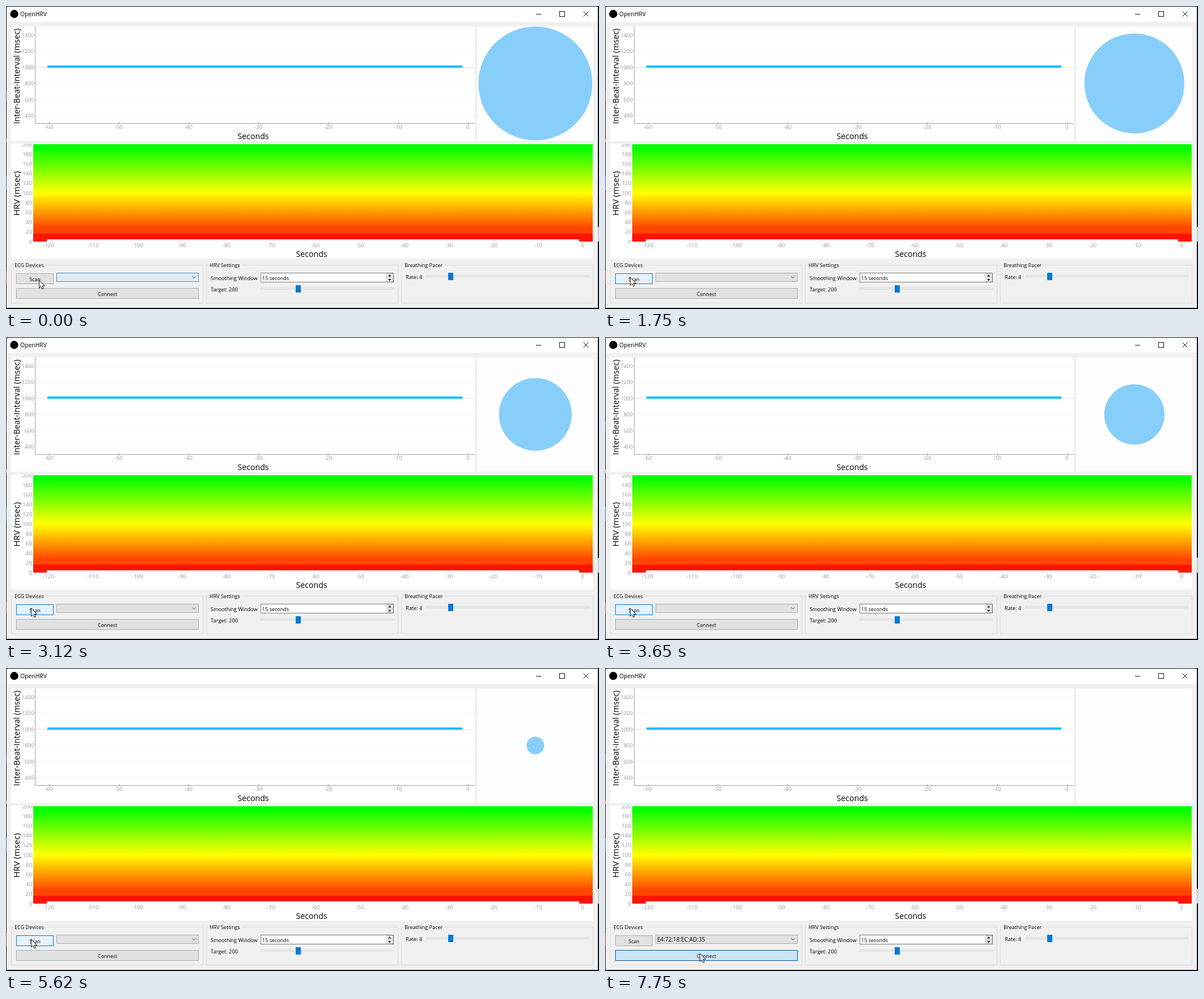
An HTML page with a canvas for the animation above (7780 ms loop, 1046 px wide and 535 px high).

```html
<!DOCTYPE html>
<html lang="en">
<head>
<meta charset="utf-8">
<title>OpenHRV</title>
<style>
  html, body { margin: 0; width: 100%; height: 100%; overflow: hidden; background: #f0f0f0; }
  canvas { display: block; }
</style>
</head>
<body>
<canvas id="stage" width="1046" height="535"></canvas>
<script>
const LOOP = 7780;
const ctx = document.getElementById('stage').getContext('2d');
const FONT = '"Open Sans", "Noto Sans", sans-serif';

const REST = [225, 225, 225, 173, 173, 173];
const HOVER = [229, 241, 251, 0, 120, 215];
const PRESS = [204, 228, 247, 0, 84, 153];
const FADING = [226, 235, 244, 70, 140, 200];

// Tracks: [time, values], linear in between
const scanTrack = [[50, REST], [330, HOVER], [510, HOVER], [620, PRESS], [920, PRESS],
  [1240, HOVER], [6450, HOVER], [6750, REST]];
const comboTrack = [[0, FADING], [280, REST]];
const connectTrack = [[6870, REST], [7090, HOVER], [7590, HOVER], [7710, PRESS]];
const cursorTrack = [[30, [58, 484]], [370, [44, 479]], [6370, [44, 479]], [6600, [112, 481]],
  [6850, [169, 490]], [7090, [161, 510]], [7160, [161, 510]], [7430, [167, 504]]];
const DEVICE_FOUND = 5865;

// Repaints of the pacer: [first, last, count]
const paints = [[30, 370, 4], [510, 1240, 7], [1340, 1340, 1], [1490, 2140, 6], [2270, 3020, 7],
  [3120, 3120, 1], [3290, 3650, 4], [3810, 4540, 7], [4640, 5390, 7], [5490, 6240, 7],
  [6370, 7100, 8], [7160, 7430, 3], [7590, 7750, 2]];

function track(keys, t) {
  if (t <= keys[0][0]) return keys[0][1];
  for (let i = 1; i < keys.length; i++) {
    const [t0, a] = keys[i - 1], [t1, b] = keys[i];
    if (t < t1) return a.map((v, k) => v + (b[k] - v) * (t - t0) / (t1 - t0));
  }
  return keys[keys.length - 1][1];
}

function lastPaint(t) {
  let last = 0;
  for (const [first, end, count] of paints) {
    if (t < first) break;
    const step = count > 1 ? (end - first) / (count - 1) : 1;
    last = first + step * Math.min(count - 1, Math.floor((t - first) / step + 1e-6));
  }
  return last;
}

function rect(x, y, w, h, fill) {
  ctx.fillStyle = fill;
  ctx.fillRect(x, y, w, h);
}

function box(x, y, w, h, fill, stroke) {
  rect(x, y, w, h, stroke);
  rect(x + 1, y + 1, w - 2, h - 2, fill);
}

function text(str, x, y, size = 9.1, color = '#000', align = 'left') {
  ctx.font = `${size}px ${FONT}`;
  ctx.fillStyle = color;
  ctx.textAlign = align;
  ctx.fillText(str, x, y);
}

function sideText(str, x, y, size) {
  ctx.save();
  ctx.translate(x, y);
  ctx.rotate(-Math.PI / 2);
  text(str, 0, 0, size, '#000', 'center');
  ctx.restore();
}

function path(points, close) {
  ctx.beginPath();
  points.forEach(([x, y]) => ctx.lineTo(x, y));
  if (close) ctx.closePath();
}

function line(points, color, width = 1) {
  path(points);
  ctx.strokeStyle = color;
  ctx.lineWidth = width;
  ctx.stroke();
}

function shape(points, fill) {
  path(points, true);
  ctx.fillStyle = fill;
  ctx.fill();
}

function disc(x, y, r, fill) {
  ctx.beginPath();
  ctx.arc(x, y, r, 0, Math.PI * 2);
  ctx.fillStyle = fill;
  ctx.fill();
}

function drawWindow() {
  rect(0, 0, 1046, 535, '#0c0c10');
  rect(1, 1, 1043, 532, '#f0f0f0');
  rect(1, 1, 1043, 27, '#fff');
  rect(0, 150, 1, 18, '#3a3a58');
  rect(0, 234, 1, 6, '#c87820');
  rect(0, 300, 1, 25, '#2860a0');
  rect(0, 468, 1, 22, '#a03018');
  rect(1044, 390, 2, 26, '#c8c8c8');
  disc(14.5, 14, 7.2, '#000');
  text('OpenHRV', 25, 18, 10.4);
  line([[935, 14.5], [944, 14.5]], '#111');
  ctx.strokeRect(976.5, 9.5, 9, 9);
  line([[1018.5, 9.5], [1027.5, 18.5]], '#111');
  line([[1027.5, 9.5], [1018.5, 18.5]], '#111');
}

function drawIntervals() {
  rect(9, 36, 818, 202, '#fff');
  for (let i = 0; i < 6; i++) {
    const y = 50.5 + i * 28.55;
    rect(53, Math.round(y), 774, 1, i === 2 ? '#e2e2e2' : '#f4f4f4');
    rect(50, Math.round(y), 2, 1, '#b4b4b4');
    text(1400 - i * 200, 49, y + 4, 9.4, '#969696', 'right');
  }
  rect(51, 36, 1, 172, '#a0a0a0');
  rect(51, 207, 776, 1, '#a0a0a0');
  for (let i = 0; i < 7; i++) {
    const x = 75.5 + i * 123.2;
    rect(Math.round(x), 205, 1, 4, '#a0a0a0');
    text(i * 10 - 60, x, 217, 9.8, '#969696', 'center');
  }
  rect(73, 105, 732, 4, '#00bfff');
  text('Seconds', 436, 235, 14.2, '#000', 'center');
  sideText('Inter-Beat-Interval (msec)', 24, 124, 14.3);
}

function drawVariability() {
  rect(9, 243, 1027, 203, '#fff');
  const g = ctx.createLinearGradient(0, 244, 0, 416);
  g.addColorStop(0, '#0f0');
  g.addColorStop(0.03, '#0f0');
  g.addColorStop(0.5, '#ff0');
  g.addColorStop(1, '#f00');
  rect(48, 244, 987, 172, g);
  rect(48, 390, 987, 12, '#ff4500');
  rect(48, 402, 987, 14, '#ff1400');
  rect(72, 412, 939, 4, '#fff');
  ctx.save();
  ctx.beginPath();
  ctx.rect(9, 243, 1027, 203);
  ctx.clip();
  for (let v = 0; v <= 200; v += 20) {
    text(v, 46, 419.5 - v * 0.86, 9.8, '#969696', 'right');
  }
  ctx.restore();
  for (let i = 0; i <= 12; i++) {
    text(i * 10 - 120, 75 + i * 78.5, 426, 9.8, '#969696', 'center');
  }
  text('Seconds', 539, 443, 14.2, '#000', 'center');
  sideText('HRV (msec)', 24, 331, 15);
}

function drawPacer(t) {
  rect(831, 36, 205, 202, '#fdfdfd');
  const phase = Math.max(0, lastPaint(t) - 40) / 15000;
  const r = 100.5 * (0.5 + 0.5 * Math.cos(phase * Math.PI * 2));
  if (r > 0.4) disc(933.75, 136.75, r, '#87cefa');
}

function group(title, x, w) {
  ctx.strokeStyle = '#dcdcdc';
  ctx.lineWidth = 1;
  ctx.strokeRect(x + 0.5, 457.5, w - 1, 67);
  ctx.font = `9.1px ${FONT}`;
  rect(x + 4, 456, ctx.measureText(title).width + 4, 3, '#f0f0f0');
  text(title, x + 6, 461);
}

function button(x, y, w, h, state, label = '') {
  const rgb = (c) => `rgb(${c.map(Math.round).join(',')})`;
  box(x, y, w, h, rgb(state.slice(0, 3)), rgb(state.slice(3)));
  text(label, x + w / 2, y + 14, 8.9, '#000', 'center');
}

function slider(x, y, w, knob) {
  box(x, y - 2, w, 4, '#e7eaea', '#dedede');
  rect(knob, y - 6, 9, 13, '#0078d7');
}

function drawControls(t) {
  group('ECG Devices', 9, 339);
  button(18, 472, 66, 19, track(scanTrack, t), 'Scan');
  button(89, 471, 251, 16, track(comboTrack, t));
  line([[328.5, 477.5], [331.5, 480.5], [334.5, 477.5]], '#444');
  if (t >= DEVICE_FOUND) text('E4:72:18:EC:AD:35', 92, 482.5, 10);
  button(18, 498, 322, 19, track(connectTrack, t), 'Connect');

  group('HRV Settings', 353, 339);
  text('Smoothing Window', 361, 484);
  box(449, 471, 235, 17, '#fff', '#7a7a7a');
  box(671, 472, 12, 8, '#f0f0f0', '#c4c4c4');
  box(671, 479, 12, 8, '#f0f0f0', '#c4c4c4');
  shape([[674, 477.5], [679.5, 477.5], [676.7, 474]], '#111');
  shape([[674, 482], [679.5, 482], [676.7, 485.5]], '#111');
  text('15 seconds', 452, 484, 9);
  text('Target: 200', 361, 504, 9.4);
  slider(449, 499, 235, 511);

  group('Breathing Pacer', 697, 339);
  text('Rate: 4', 705, 482, 9.2);
  slider(741, 477, 287, 780);
}

function drawCursor(t) {
  const [x, y] = track(cursorTrack, t).map(Math.round);
  const arrow = [[0, 0], [0, 14], [3.2, 11], [5.5, 16], [7.7, 15], [5.5, 10.3], [10, 10.3]]
    .map(([dx, dy]) => [x + dx + 0.5, y + dy]);
  shape(arrow, '#fff');
  ctx.strokeStyle = '#000';
  ctx.lineWidth = 0.9;
  ctx.stroke();
}

function draw() {
  const t = performance.now() % LOOP;
  drawWindow();
  drawIntervals();
  drawPacer(t);
  drawVariability();
  drawControls(t);
  drawCursor(t);
  requestAnimationFrame(draw);
}
draw();
</script>
</body>
</html>
```
